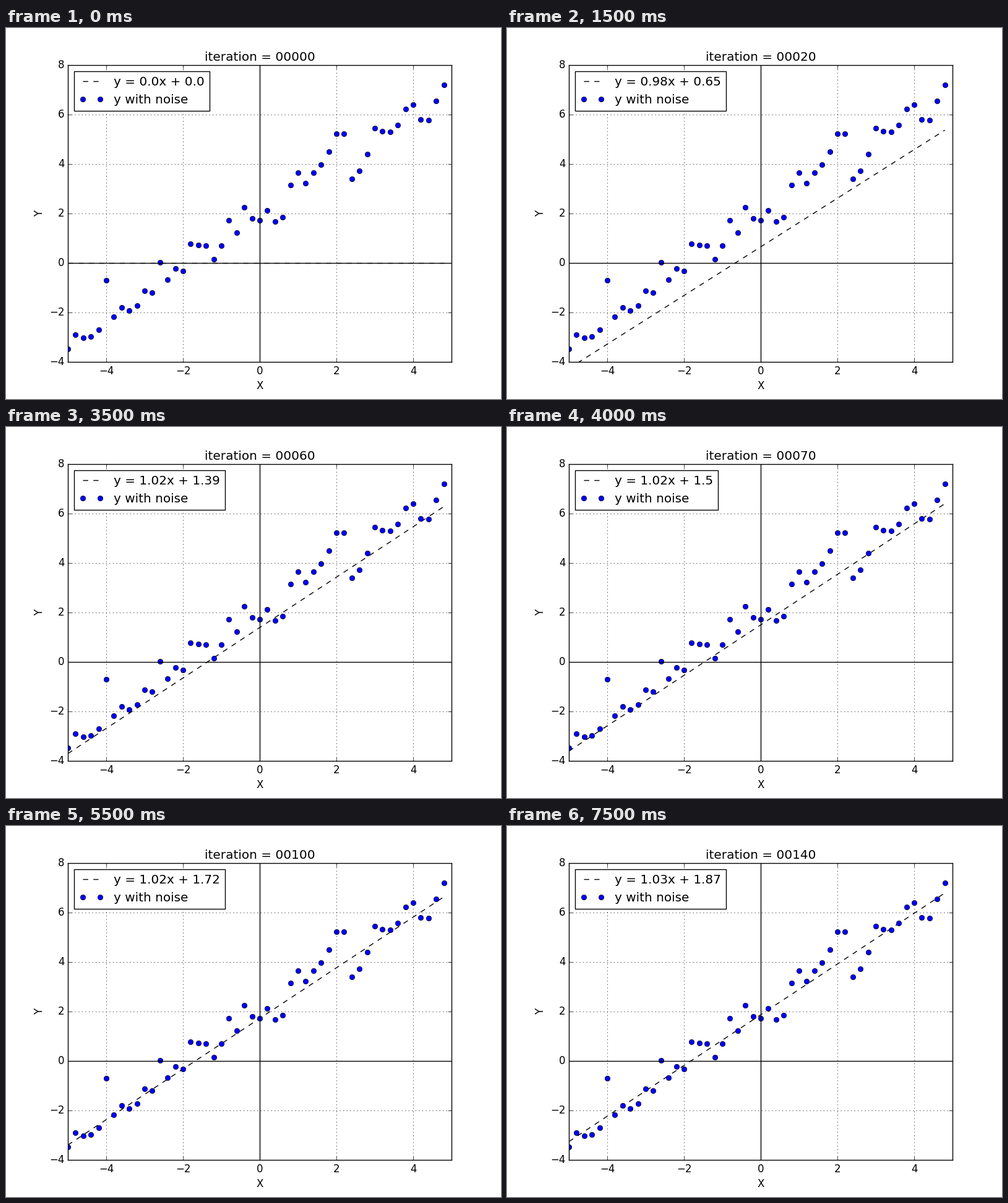
A matplotlib script that plays this animation: 800 px wide and 600 px high, repeating every 8000 ms.

```python
import numpy as np
import matplotlib.pyplot as plt
from matplotlib.animation import FuncAnimation

plt.style.use("classic")
plt.rcParams.update({
    "figure.facecolor": "white",
    "font.family": "DejaVu Sans",
    "axes.unicode_minus": True,
})

RATE = 0.02
BEST = np.array([1.0272, 1.9865])  # least-squares slope and intercept
STEPS = [0, 5] + list(range(10, 150, 10))

x = -5 + 0.2 * np.arange(50)
y = np.array([
    -139, -116, -121, -119, -108, -28, -87, -72, -77, -69,
    -45, -48, 1, -27, -9, -13, 31, 29, 28, 6,
    28, 69, 49, 90, 72, 69, 85, 67, 74, 126,
    146, 129, 146, 159, 180, 209, 209, 136, 149, 176,
    218, 213, 212, 223, 249, 256, 232, 231, 262, 288,
]) / 40


def descend(steps):
    """Slope and intercept after some steps of gradient descent from zero."""
    design = np.column_stack([x, np.ones_like(x)])
    hessian = design.T @ design / len(x)
    w = np.zeros(2)
    for _ in range(steps):
        w = w - RATE * hessian @ (w - BEST)
    return w


fig = plt.figure(figsize=(8, 6), dpi=100)
ax = fig.add_subplot(111)

fit, = ax.plot(x, 0 * x, "k--", label="y = 0.0x + 0.0")
ax.plot(x, y, "o", mfc="b", mec="k", mew=0.5, color="b", label="y with noise")
ax.axhline(0, color="k")
ax.axvline(0, color="k")

ax.set_xlim(-5, 5)
ax.set_ylim(-4, 8)
ax.set_xticks(range(-4, 5, 2))
ax.set_yticks(range(-4, 9, 2))
ax.set_xlabel("X")
ax.set_ylabel("Y")
ax.grid(True)
title = ax.set_title("iteration = 00000")
formula = ax.legend(loc="upper left").get_texts()[0]


def update(i):
    slope, offset = descend(STEPS[i])
    fit.set_ydata(slope * x + offset)
    title.set_text(f"iteration = {STEPS[i]:05d}")
    formula.set_text(f"y = {round(float(slope), 2)}x + {round(float(offset), 2)}")
    return fit, title, formula


anim = FuncAnimation(fig, update, frames=len(STEPS), interval=500,
                     repeat=True, repeat_delay=0, blit=False)
plt.show()
```
